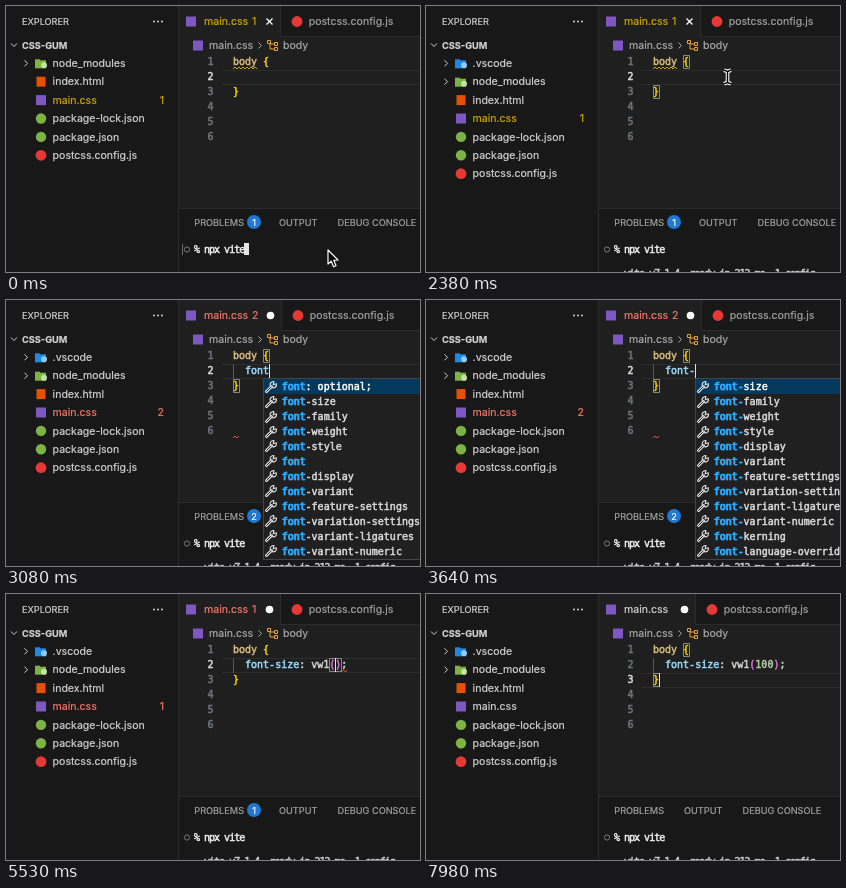
Animation, 414 px wide and 266 px high, one loop 8000 ms. Source, as an HTML page with a canvas:

```html
<!DOCTYPE html>
<html lang="en">
<head>
<meta charset="utf-8">
<title>Editor session</title>
<style>
html, body { margin: 0; width: 100%; height: 100%; overflow: hidden; background: #181818; }
canvas { display: block; }
</style>
</head>
<body>
<canvas id="stage" width="414" height="266"></canvas>
<script>
const ctx = document.getElementById('stage').getContext('2d');
const LOOP = 8000, CELL = 6.02, CODE_X = 227, ROW = 15;
const UI = '10.55px Inter, sans-serif', SMALL = '9.2px Inter, sans-serif';
const BOLD = '700 9.2px Inter, sans-serif', MONO = '10px "DejaVu Sans Mono", monospace';
const GREY = '#a2a2a2', LIGHT = '#d2d2d2', GOLD = '#ffd700', PINK = '#da70d6';
const WARN = '#cca700', ERROR = '#f4776a', ORANGE = '#e8a33d', BLUE = '#2aaaff';

// [time, line 2, caret column]
const edits = [
  [0, '', 2], [2730, 'f', 3], [2870, 'fo', 4], [2940, 'fon', 5], [3080, 'font', 6],
  [3570, 'font-', 7], [3760, 'font-size: ;', 13], [4830, 'font-size: v;', 14],
  [4970, 'font-size: vw;', 15], [5110, 'font-size: vw1;', 16], [5530, 'font-size: vw1();', 17],
  [5950, 'font-size: vw1(1);', 18], [6580, 'font-size: vw1(10);', 19], [6720, 'font-size: vw1(100);', 20],
];
const CLICK = 1820, DOWN = 7630, ENTER = 280, READY = 1050;

const fontProps = ('size family weight style display variant feature-settings variation-settings ' +
  'variant-ligatures variant-numeric kerning language-override').split(' ').map(s => 'font-' + s);
const fontItems = ['font: optional;', ...fontProps.slice(0, 4), 'font', ...fontProps.slice(4, 10)];
const sizes = 'large larger medium small smaller x-large x-small xx-large xx-small 0% 0cap 0ch'.split(' ');
const vItems = 'vw1() vw2() var() 0vb 0vh 0vi 0vmax 0vmin 0vw'.split(' ');
// [time, column, items, matched length]
const popups = [
  [0], [2940, 5, fontItems, 3], [3080, 5, fontItems, 4], [3570, 7, fontProps, 5], [3760],
  [3990, 13, sizes, 0], [4830, 13, vItems, 1], [4970, 13, ['vw1()', 'vw2()', '0vw'], 2],
  [5110, 13, ['vw1()'], 3], [5530],
];
// [time, count, colour, left edge of second tab]
const problems = [[0, 1, WARN, 274], [2940, 2, ERROR, 275], [4480, 1, ERROR, 274], [6020, 0, LIGHT, 269]];
const pointer = [[0, 322, 244], [1050, 322, 244], [1820, 304, 78], [1960, 304, 78], [2170, 301.5, 71], [2730, 301.5, 71]];

const at = (list, t) => list.findLast(e => e[0] <= t);

function rect(x, y, w, h, color) { ctx.fillStyle = color; ctx.fillRect(x, y, w, h); }
function frame(x, y, w, h, color) { ctx.strokeStyle = color; ctx.lineWidth = 1; ctx.strokeRect(x + .5, y + .5, w - 1, h - 1); }
function dot(x, y, r, color) { ctx.fillStyle = color; ctx.beginPath(); ctx.arc(x, y, r, 0, 7); ctx.fill(); }
function poly(points, color, width = 1) {
  ctx.strokeStyle = color;
  ctx.lineWidth = width;
  ctx.beginPath();
  points.forEach(([x, y]) => ctx.lineTo(x, y));
  ctx.stroke();
}
// A hairline outline gives the slightly heavy look of smoothed screen text.
function text(s, x, y, color = LIGHT, font = UI, align = 'left') {
  ctx.font = font;
  ctx.fillStyle = ctx.strokeStyle = color;
  ctx.textAlign = align;
  ctx.lineWidth = font === MONO ? .5 : .2;
  ctx.lineJoin = 'round';
  ctx.fillText(s, x, y + 3.6);
  ctx.strokeText(s, x, y + 3.6);
}
function code(runs, x, y) {
  for (const [s, color] of runs) {
    text(s, x, y, color, MONO);
    x += s.length * CELL;
  }
}
function chevron(x, y, down, color = LIGHT) {
  poly(down ? [[x - 3, y - 1.5], [x, y + 1.5], [x + 3, y - 1.5]] : [[x - 1.5, y - 3], [x + 1.5, y], [x - 1.5, y + 3]], color);
}
function squiggle(x, y, w, color) {
  const points = [];
  for (let i = 0; i <= w; i += 2) points.push([x + i, y + (i % 4 ? -1 : 1)]);
  poly(points, color);
}
function folder(x, y, color, mark) {
  rect(x - 6, y - 4, 5, 3, color);
  rect(x - 6, y - 3, 11, 8, color);
  dot(x + 3, y + 2, 3, mark);
}
const icons = {
  html: (x, y) => rect(x - 4.5, y - 5, 9, 10, '#e65100'),
  css: (x, y) => rect(x - 5, y - 5, 10, 10, '#7e57c2'),
  json: (x, y) => dot(x, y, 5.2, '#7cb342'),
  js: (x, y) => dot(x, y, 5.4, '#e53935'),
  code: (x, y) => folder(x, y, '#1e88e5', '#90caf9'),
  modules: (x, y) => folder(x, y, '#7cb342', '#c5e1a5'),
};

function sidebar(t, [, count, color]) {
  text('EXPLORER', 16, 15.5, LIGHT, SMALL);
  for (const x of [148, 152, 156]) dot(x, 15.5, 1, LIGHT);
  chevron(8, 39, true);
  text('CSS-GUM', 16, 39, LIGHT, BOLD);
  const files = [['.vscode', 'code'], ['node_modules', 'modules'], ['index.html', 'html'], ['main.css', 'css'],
    ['package-lock.json', 'json'], ['package.json', 'json'], ['postcss.config.js', 'js']];
  files.slice(t < READY ? 1 : 0).forEach(([name, kind], i) => {
    const y = 57.3 + i * 18.4, main = kind === 'css';
    if (kind === 'code' || kind === 'modules') chevron(20, y, false);
    icons[kind](35, y);
    text(name, 46.6, y, main ? color : LIGHT);
    if (main && count) text(count, 158, y, color, UI, 'right');
  });
}

function tabs(t, [, count, color, edge]) {
  rect(172, 0, 242, 31, '#181818');
  rect(172, 30, 242, 1, '#2b2b2b');
  rect(172, 0, edge - 172, 31, '#1f1f1f');
  rect(edge, 0, 1, 31, '#2b2b2b');
  icons.css(185, 15.5);
  text('main.css', 198, 15.5, color);
  if (count) text(count, 246, 15.5, color);
  const x = edge - 10.5;
  if (t >= 2730) dot(x, 15.5, 3.8, '#ffffff');
  else {
    poly([[x - 3, 12.5], [x + 3, 18.5]], '#ffffff', 1.2);
    poly([[x + 3, 12.5], [x - 3, 18.5]], '#ffffff', 1.2);
  }
  icons.js(edge + 17, 15.5);
  text('postcss.config.js', edge + 28.7, 15.5, GREY);

  icons.css(192, 39.5);
  text('main.css', 203, 39.5, '#a9a9a9');
  chevron(254, 39.5, false, '#a9a9a9');
  poly([[264, 37], [264, 43], [268, 43]], ORANGE);
  poly([[264, 38], [268, 38]], ORANGE);
  frame(261, 34, 4, 4, ORANGE);
  frame(268, 36, 4, 4, ORANGE);
  frame(268, 41, 4, 4, ORANGE);
  text('body', 277, 39.5, '#a9a9a9');
}

function lineRuns(line) {
  const [, name, rest] = line.match(/^([a-z-]*)(.*)$/);
  const tokens = rest.match(/[()]|\d+(?=\))|[^()\d]+|\d/g) || [];
  return [[name, '#9cdcfe'], ...tokens.map((s, i) =>
    [s, /[()]/.test(s) ? PINK : /^\d+$/.test(s) && tokens[i - 1] === '(' ? '#b5cea8' : '#d4d4d4'])];
}

function editor(t, [, count, color]) {
  const [since, line, col] = at(edits, t);
  const active = t >= DOWN ? 2 : 1, lineY = i => 55.8 + i * ROW, colX = c => CODE_X + c * CELL;
  for (const y of [0, ROW - 1]) rect(216, 49 + active * ROW + y, 198, 1, '#2d2d2d');
  for (let i = 0; i < 6; i++) text(i + 1, 207.6, lineY(i), i === active ? '#e0e0e0' : '#6e7681', MONO, 'right');
  if (line) rect(CODE_X, 64, 1, ROW, '#585858');

  code([['body ', '#d7ba7d'], ['{', GOLD]], CODE_X, lineY(0));
  code(lineRuns(line), colX(2), lineY(1));
  code([['}', GOLD]], CODE_X, lineY(2));

  if (color === WARN) squiggle(CODE_X, 62, 24, WARN);
  if (count === 2) squiggle(CODE_X, 137, 6, '#f14c4c');
  if (count === 1 && color === ERROR) squiggle(colX(line.length + 1), 77, 6, '#f14c4c');

  if (t < CLICK) return;
  const inside = line.includes('(') && t < DOWN;
  const pair = inside ? [[line.indexOf('(') + 2, 1], [line.indexOf(')') + 2, 1]] : [[5, 0], [0, 2]];
  for (const [c, i] of pair) frame(Math.round(colX(c)), 49 + i * ROW, 7, 14, '#888888');
  const moved = t >= DOWN ? DOWN : Math.max(since, CLICK);
  if ((t - moved) % 1000 < 500) rect(Math.round(colX(t >= DOWN ? 1 : col)), 49 + active * ROW, 1, 14, '#e0e0e0');
}

function panel(t, [, count]) {
  rect(172, 202, 242, 64, '#181818');
  rect(172, 202, 242, 1, '#2b2b2b');
  text('PROBLEMS', 188.3, 216, GREY, SMALL);
  if (count) {
    dot(248, 216, 7, '#1f78d1');
    text(count, 248, 216, '#ffffff', SMALL, 'center');
  }
  const x = count ? 273 : 258;
  text('OUTPUT', x, 216, GREY, SMALL);
  text('DEBUG CONSOLE', x + 58.5, 216, GREY, SMALL);

  ctx.strokeStyle = '#7a7a7a';
  ctx.lineWidth = 1;
  ctx.beginPath();
  ctx.arc(181, 243.5, 2.6, 0, 7);
  ctx.stroke();
  if (t < READY) rect(176, 238, 1, 11, '#6a6a6a');
  ctx.letterSpacing = '-1px';
  text('% npx vite', 188, 243, '#f0f0f0', MONO);
  if (t >= READY) text('  vite v7.1.4  ready in 212 ms, 1 config', 188, 267.5, '#cfcfcf', MONO);
  ctx.letterSpacing = '0px';
  if (t < ENTER) rect(238, 237, 5, 12, '#e5e5e5');
  else if (t < READY) rect(188, 249, 5, 12, '#e5e5e5');
}

function itemIcon(item, x, y) {
  if (item.startsWith('font')) {
    ctx.lineCap = 'round';
    poly([[x - 4.5, y + 4.5], [x + .5, y - .5]], '#dddddd', 3);
    poly([[x - 4.5, y + 4.5], [x + .5, y - .5]], '#202020', 1);
    ctx.lineCap = 'butt';
    ctx.strokeStyle = '#dddddd';
    ctx.lineWidth = 1.2;
    ctx.beginPath();
    ctx.arc(x + 2.3, y - 2.3, 3.1, -.3, 4.9);
    ctx.lineTo(x + 2.3, y - 2.3);
    ctx.closePath();
    ctx.stroke();
  } else if (item[0] === '0') {
    frame(x - 3, y - 5, 8, 11, '#dddddd');
    for (const d of [-3, 0, 3]) rect(x - 2, y + d, 3, 1, '#dddddd');
  } else {
    frame(x, y - 5, 6, 6, ORANGE);
    rect(x + 2, y - 3, 2, 1, ORANGE);
    rect(x - 5, y - 1, 8, 6, ORANGE);
    rect(x - 3, y, 4, 1, '#202020');
    rect(x - 3, y + 2, 4, 1, '#202020');
  }
}

function popup(t) {
  const [, col, items, match] = at(popups, t);
  if (!items) return;
  const x = Math.round(CODE_X + col * CELL), height = items.length * ROW + 2;
  rect(x, 78, 180, height, '#202020');
  frame(x, 78, 180, height, '#454545');
  rect(x + 1, 79, 178, ROW, '#04395e');
  items.forEach((item, i) => {
    const y = 86.6 + i * 14.97, from = item[0] === '0' ? 1 : 0, plain = i ? '#dcdcdc' : '#ffffff';
    itemIcon(item, x + 8, Math.round(y));
    code([[item.slice(0, from), plain], [item.slice(from, from + match), BLUE],
      [item.slice(from + match), plain]], x + 18.5, y);
    if (match) text(item.slice(from, from + match), x + 18.9 + from * CELL, y, BLUE, MONO);
  });
}

function mouse(t) {
  const i = pointer.findIndex(p => p[0] > t);
  if (i < 0) return;
  const [t0, x0, y0] = pointer[i - 1], [t1, x1, y1] = pointer[i];
  const u = (t - t0) / (t1 - t0), k = u * u * (3 - 2 * u);
  const x = x0 + (x1 - x0) * k, y = y0 + (y1 - y0) * k;
  if (y < 202) {
    for (const [color, width] of [['#ffffff', 3.6], ['#000000', 1.4]]) {
      poly([[x, y - 5.5], [x, y + 5.5]], color, width);
      for (const s of [-1, 1]) poly([[x - 3.5, y + 6.8 * s], [x, y + 5.5 * s], [x + 3.5, y + 6.8 * s]], color, width);
    }
    return;
  }
  ctx.beginPath();
  for (const [dx, dy] of [[0, 0], [0, 14], [3.2, 11.2], [5.6, 16.8], [8, 15.8], [5.7, 10.3], [10, 10]]) ctx.lineTo(x + dx, y + dy);
  ctx.closePath();
  ctx.fillStyle = '#000000';
  ctx.strokeStyle = '#ffffff';
  ctx.lineWidth = 1.2;
  ctx.fill();
  ctx.stroke();
}

function draw(now) {
  const t = now % LOOP, issue = at(problems, t);
  rect(0, 0, 414, 266, '#181818');
  rect(172, 0, 242, 266, '#1f1f1f');
  sidebar(t, issue);
  tabs(t, issue);
  editor(t, issue);
  panel(t, issue);
  rect(172, 0, 1, 266, '#2b2b2b');
  popup(t);
  mouse(t);
  requestAnimationFrame(draw);
}
requestAnimationFrame(draw);
</script>
</body>
</html>
```
